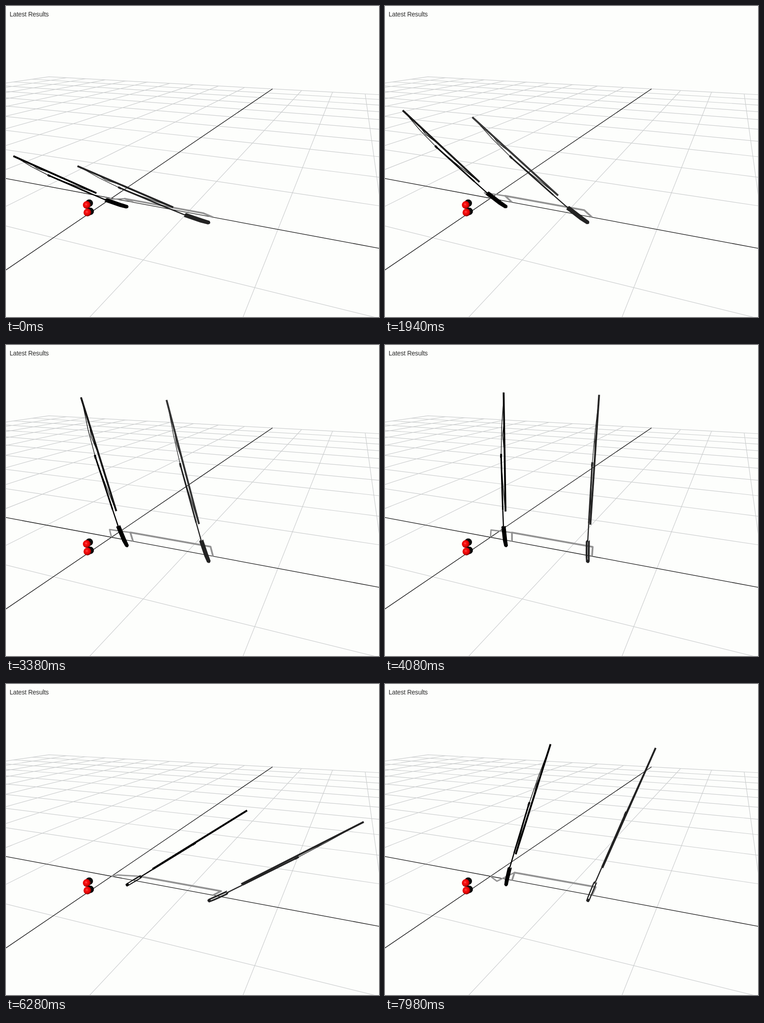
An HTML page for the animation above (8 s loop, 820 by 683 pixels).

```html
<!DOCTYPE html>
<html lang="en">
<head>
<meta charset="utf-8">
<title>Latest Results</title>
<style>
html, body { margin: 0; width: 100%; height: 100%; overflow: hidden; background: #fdfefc; }
svg { display: block; width: 100%; height: 100%; }
text { font: 14px "Liberation Sans", Arial, sans-serif; letter-spacing: -.2px; fill: #2a2a2a; }
path { fill: none; stroke-linejoin: round; }
</style>
</head>
<body>
<svg id="stage" viewBox="0 0 820 683">
  <defs>
    <radialGradient id="ball" cx=".42" cy=".42" r=".6">
      <stop offset="0" stop-color="#ff5a5a"/>
      <stop offset=".25" stop-color="#fa1414"/>
      <stop offset=".7" stop-color="#e00000"/>
      <stop offset="1" stop-color="#500000"/>
    </radialGradient>
  </defs>
  <g id="floor"></g>
  <g id="links"></g>
  <g id="balls">
    <circle cx="183" cy="433" r="8.3" fill="#0c0c0c"/>
    <circle cx="177.5" cy="437" r="8.5" fill="url(#ball)"/>
    <circle cx="185" cy="451" r="8.3" fill="#0c0c0c"/>
    <circle cx="179" cy="453.5" r="8.5" fill="url(#ball)"/>
  </g>
  <g id="wipers"></g>
  <text x="8" y="23">Latest Results</text>
</svg>
<script>
const NS = 'http://www.w3.org/2000/svg';
const RAD = Math.PI / 180;
const byId = id => document.getElementById(id);

// Camera: world axes given as (right, down, forward).
const FOCAL = 830, NEAR = 0.05;
const pitch = 18.94 * RAD, yaw = 22.34 * RAD;
const sp = Math.sin(pitch), cp = Math.cos(pitch), sy = Math.sin(yaw), cy = Math.cos(yaw);
const AX = [cy, sy * sp, -sy * cp];
const AY = [sy, -cy * sp, cy * cp];
const AZ = [0, -cp, -sp];
const ORIGIN = [-0.9797, 0.4442, 4.565];

const toCam = ([x, y, z]) => ORIGIN.map((o, i) => o + x * AX[i] + y * AY[i] + z * AZ[i]);
const toScreen = ([x, y, z]) =>
  (410 + FOCAL * x / z).toFixed(2) + ' ' + (341.5 + FOCAL * y / z).toFixed(2);
const poly = pts => 'M' + pts.map(p => toScreen(toCam(p))).join('L');

function clippedLine(a, b) {
  let p = toCam(a), q = toCam(b);
  if (p[2] < NEAR && q[2] < NEAR) return '';
  if (p[2] > q[2]) [p, q] = [q, p];
  if (p[2] < NEAR) {
    const k = (NEAR - p[2]) / (q[2] - p[2]);
    p = p.map((v, i) => v + (q[i] - v) * k);
  }
  return 'M' + toScreen(p) + 'L' + toScreen(q);
}

function addPath(parent, stroke, width, extra = {}) {
  const el = document.createElementNS(NS, 'path');
  const attrs = { stroke, 'stroke-width': width, ...extra };
  for (const k in attrs) el.setAttribute(k, attrs[k]);
  return parent.appendChild(el);
}

// Floor grid
const SIZE = 10;
let grid = '', axes = '';
for (let i = -SIZE; i <= SIZE; i++) {
  const d = clippedLine([i, -SIZE, 0], [i, SIZE, 0]) + clippedLine([-SIZE, i, 0], [SIZE, i, 0]);
  if (i) grid += d; else axes += d;
}
addPath(byId('floor'), '#cbcdce', 1.2).setAttribute('d', grid);
addPath(byId('floor'), '#101010', 1.3).setAttribute('d', axes);

// Four-bar linkage: a steady crank at the origin drives two parallel rockers.
const CRANK = 0.1, ROCKER = 0.109, COUPLER = 0.3, PIVOTS = [0.3, 1.3];
const START = 198, STEP = 1.332, ARM_OFFSET = 5.6 * RAD, BAR_HEIGHT = 0.113;

function armAngle(theta) {
  const vx = PIVOTS[0] - CRANK * Math.cos(theta), vy = -CRANK * Math.sin(theta);
  const v = Math.hypot(vx, vy);
  const c = (COUPLER ** 2 - v * v - ROCKER ** 2) / (2 * ROCKER * v);
  return Math.atan2(vy, vx) + Math.acos(Math.max(-1, Math.min(1, c))) + ARM_OFFSET;
}

const crankPath = addPath(byId('links'), '#959595', 3);
const barPath = addPath(byId('links'), '#929292', 3.8);

// Wiper profile as [distance from pivot, depth]
const HANDLE = [[0, -0.12], [0, -0.145], [0.08, -0.17], [0.26, -0.196], [0.26, -0.161], [0.08, -0.135]];
const SHAFT = [[0.25, -0.18], [0.46, -0.187]];
const ARM = [[0.46, -0.187], [1.07, -0.2]];
const ELBOW = [[1.05, -0.202], [1.09, -0.198]];
const BRACKET = [[1.62, -0.138], [1.36, -0.18], [1.07, -0.2], [0.8, -0.18], [0.45, -0.138]];
const CLAW = [[1.4, -0.135], [1.28, -0.165], [1.1, -0.135]];
const BLADE = [[0.425, -0.132], [1.7, -0.132]];

function makeWiper(pivot, color) {
  const g = byId('wipers').appendChild(document.createElementNS(NS, 'g'));
  const bracket = addPath(g, color, 1.3);
  const shaft = addPath(g, color, 2.5);
  const arm = addPath(g, color, 3.3);
  const elbow = addPath(g, color, 4.2);
  const blade = addPath(g, color, 4);
  const sheen = addPath(g, '#aaa', 1.5, { 'stroke-dasharray': '2 1.4' });
  const handle = addPath(g, color, 1.5, { style: 'fill:' + color });
  const hub = addPath(g, color, 6, { 'stroke-linecap': 'round' });

  return angle => {
    const c = Math.cos(angle), s = Math.sin(angle);
    const place = (pts, off = 0) =>
      poly(pts.map(([u, y]) => [pivot + u * c - off * s, y, u * s + off * c]));
    bracket.setAttribute('d', place(BRACKET) + place(CLAW));
    shaft.setAttribute('d', place(SHAFT));
    arm.setAttribute('d', place(ARM));
    elbow.setAttribute('d', place(ELBOW));
    blade.setAttribute('d', place(BLADE));
    sheen.setAttribute('d', place(BLADE));
    sheen.setAttribute('opacity', (0.85 * Math.exp(-(((angle / RAD - 126) / 22) ** 2))).toFixed(3));
    handle.setAttribute('d', place(HANDLE, 0.012) + 'Z' + place(HANDLE, -0.012) + 'Z');
    hub.setAttribute('d', place([[0, -0.132], [0.008, -0.132]]));
  };
}

const wipers = [makeWiper(PIVOTS[0], '#000'), makeWiper(PIVOTS[1], '#232323')];

function draw(n) {
  const theta = (START - STEP * n) * RAD;
  const arm = armAngle(theta);
  const tip = [CRANK * Math.cos(theta), 0, CRANK * Math.sin(theta)];
  const [b, c] = PIVOTS.map(x => [x + BAR_HEIGHT * Math.cos(arm), 0, BAR_HEIGHT * Math.sin(arm)]);
  crankPath.setAttribute('d', poly([[0, 0, 0], tip, b]));
  barPath.setAttribute('d', poly([[PIVOTS[0], 0, 0], b, c, [PIVOTS[1], 0, 0]]));
  wipers.forEach(w => w(arm));
}

// Steps hold for 20, 100 and 20 ms in turn.
const LOOP = 8000;
function stepAt(ms) {
  const r = ms % 140;
  return 3 * Math.floor(ms / 140) + (r < 20 ? 0 : r < 120 ? 1 : 2);
}

const t0 = performance.now();
function tick() {
  draw(stepAt((performance.now() - t0) % LOOP));
  requestAnimationFrame(tick);
}
tick();
</script>
</body>
</html>
```
